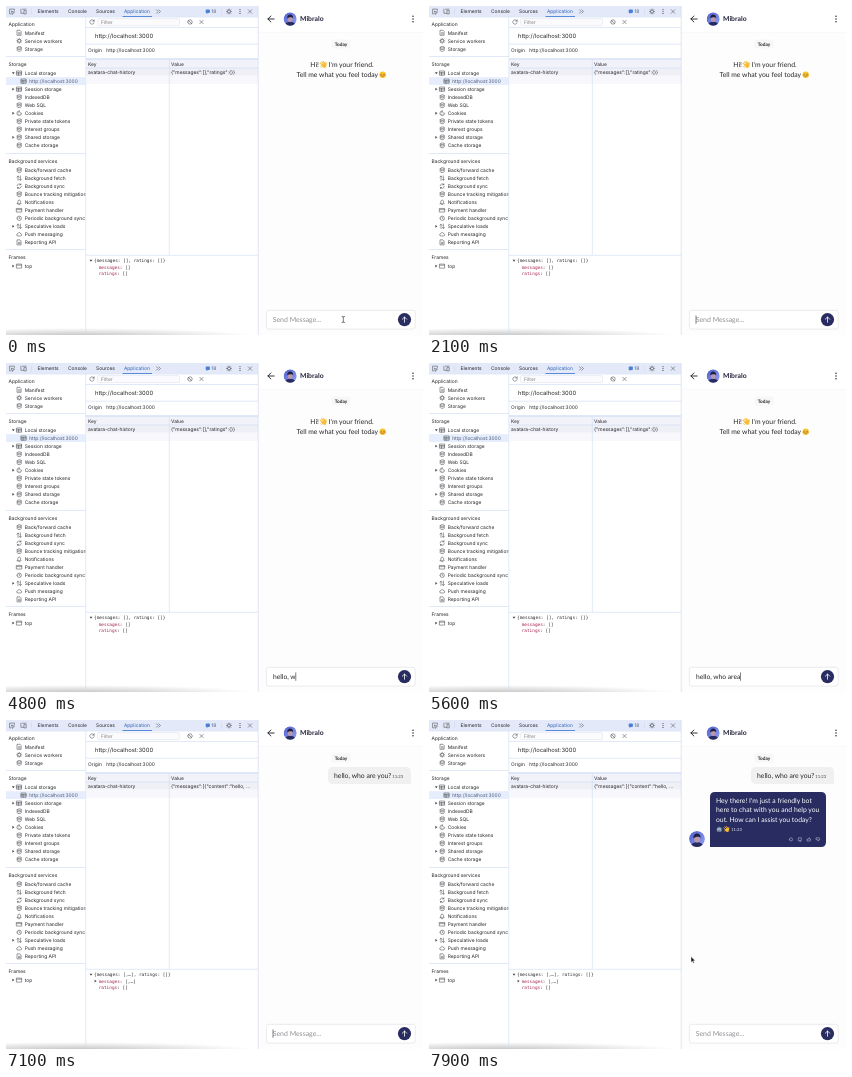
Animation of 417x329 px, one loop 8 s. Source, as an HTML page:

```html
<!DOCTYPE html>
<html lang="en">
<head>
<meta charset="utf-8">
<title>Chat history in local storage</title>
<style>
html, body { margin: 0; width: 100%; height: 100%; overflow: hidden; background: #fff; }
svg { display: block; width: 100vw; height: 100vh; }
text { white-space: pre; text-rendering: geometricPrecision; fill: #25262a; }
.ui { font: 4.9px Inter, Roboto, sans-serif; }
.mono { font: 4.4px "DejaVu Sans Mono", monospace; }
.chat { font: 6.82px Lato, "Open Sans", sans-serif; }
.key { fill: #a3204f; }
.icon { fill: none; stroke: #55585f; stroke-width: .6; stroke-linejoin: round; stroke-linecap: round; }
.rule { stroke: #cddbf4; stroke-width: .6; }
</style>
</head>
<body>
<svg id="stage" viewBox="0 0 417 329" xmlns="http://www.w3.org/2000/svg">
  <defs>
    <linearGradient id="sky" x1="0" y1="0" x2="1" y2="1">
      <stop offset="0" stop-color="#4d5ed0"/><stop offset="1" stop-color="#97a4f0"/>
    </linearGradient>
    <radialGradient id="shade">
      <stop offset="0" stop-color="#777" stop-opacity=".45"/><stop offset="1" stop-color="#777" stop-opacity="0"/>
    </radialGradient>
    <clipPath id="disc"><circle r="8"/></clipPath>
    <clipPath id="side"><rect width="79.5" height="329"/></clipPath>
    <g id="face" clip-path="url(#disc)">
      <circle r="8" fill="url(#sky)"/>
      <path d="M-6.5 9C-6 4-3 3.2 0 3.2S6 4 6.5 9z" fill="#272b5f"/>
      <ellipse cy="-.4" rx="3" ry="4" fill="#b798ac"/>
      <path d="M-3.5-.6C-4.6-7 4.6-7 3.5-.6 2.8-3-1.6-2.4-3.5-.6z" fill="#1f2044"/>
    </g>
    <g id="wave" fill="#f7bd35">
      <path d="M-3.2-1.4L-.8 1M-1.8-2.8L.7-.2M0-3.1L1.9-.8M2.7-1.9L2.5 .8" stroke="#f7bd35" stroke-width="1.15" stroke-linecap="round"/>
      <path d="M-1.4 0L1.8-1.5 2.9 .6Q3.2 3.2 1 3.3 -.4 3.3-2.4 1z"/>
      <path d="M-3.1 1.5Q-2.8 3-1.4 3.2" fill="none" stroke="#d79c2c" stroke-width=".4"/>
    </g>
    <g id="smile">
      <circle r="3.2" fill="#f9c62f"/>
      <g fill="none" stroke="#744b18" stroke-width=".55" stroke-linecap="round">
        <path d="M-2-.5Q-1.4-1.4-.7-.5M.7-.5Q1.4-1.4 2-.5M-1.6 1Q0 2.5 1.6 1"/>
      </g>
      <circle cx="-2.2" cy=".6" r=".7" fill="#f28b55"/><circle cx="2.2" cy=".6" r=".7" fill="#f28b55"/>
    </g>
    <g id="robot">
      <rect x="-2.5" y="-2" width="5" height="4.7" rx="1" fill="#a9bdc9"/>
      <path d="M0-2V-3.3M-3 0V1.4M3 0V1.4" stroke="#e36b5b" stroke-width=".7"/>
      <circle cx="-1.1" cy="-.3" r=".7" fill="#3da2b9"/><circle cx="1.1" cy="-.3" r=".7" fill="#3da2b9"/>
      <path d="M-1.3 1.6H1.3" stroke="#48515c" stroke-width=".7"/>
    </g>
  </defs>
  <g id="tools"></g>
  <g id="chat"></g>
</svg>
<script>
const NS = "http://www.w3.org/2000/svg";
const tools = document.getElementById("tools");
const chat = document.getElementById("chat");

function add(parent, tag, attrs = {}, content) {
  const node = document.createElementNS(NS, tag);
  for (const k in attrs) node.setAttribute(k, attrs[k]);
  if (content !== undefined) node.textContent = content;
  parent.append(node);
  return node;
}
const box = (p, x, y, width, height, fill, more) => add(p, "rect", { x, y, width, height, fill, ...more });
const group = (p, x = 0, y = 0) => add(p, "g", { transform: `translate(${x} ${y})` });
const label = (p, x, y, s, cls = "ui", style = "") => add(p, "text", { x, y, class: cls, style }, s);
const rule = (x1, y1, x2, y2) => add(tools, "line", { x1, y1, x2, y2, class: "rule" });
const icon = (p, x, y, d, style = "") => add(p, "path", { d, class: "icon", transform: `translate(${x} ${y})`, style });
const use = (p, id, x, y, scale = 1) =>
  add(p, "use", { href: "#" + id, transform: `translate(${x} ${y}) scale(${scale})` });
const show = (node, on) => node.setAttribute("visibility", on ? "visible" : "hidden");
const move = (node, x, y) => node.setAttribute("transform", `translate(${x} ${y})`);

const ICONS = {
  doc: "M-1.8-2.5H.8L1.9-1.4V2.5H-1.8zM-.8 0H.9M-.8 1.2H.9",
  gear: "M-1.6 0A1.6 1.6 0 1 0 1.6 0A1.6 1.6 0 1 0-1.6 0M0-2.5V-1.7M0 1.7V2.5M-2.5 0H-1.7M1.7 0H2.5M-1.8-1.8L-1.2-1.2M1.8 1.8L1.2 1.2M-1.8 1.8L-1.2 1.2M1.8-1.8L1.2-1.2",
  db: "M-2-1.6C-2-2.7 2-2.7 2-1.6S-2-.5-2-1.6V1.6C-2 2.7 2 2.7 2 1.6V-1.6M-2 0C-2 1.1 2 1.1 2 0",
  table: "M-2.4-2.1H2.4V2.1H-2.4zM-2.4-.7H2.4M-2.4 .7H2.4M-.7-.7V2.1",
  cookie: "M0-2.3A2.3 2.3 0 1 0 2.3 0Q1 .2 .9-.9-.1-.9 0-2.3M-.9-.4V-.3M-.3 1.1V1.2",
  updown: "M-1.2 2.2V-2.1M-2.3-1L-1.2-2.1-.1-1M1.2-2.2V2.1M.1 1L1.2 2.1 2.3 1",
  sync: "M-2.1-.4A2.1 2.1 0 0 1 1.7-1.3V-2.4M1.7-1.3H.5M2.1 .4A2.1 2.1 0 0 1-1.7 1.3V2.4M-1.7 1.3H-.5",
  bell: "M-2 1.5H2L1.4 .7V-.6Q1.3-2 0-2.2-1.3-2-1.4-.6V.7zM-.5 2.4H.5",
  card: "M-2.5-1.8H2.5V1.8H-2.5zM-2.5-.6H2.5",
  clock: "M-2.2 0A2.2 2.2 0 1 0 2.2 0A2.2 2.2 0 1 0-2.2 0M0-1.2V0L1 .7",
  cloud: "M-1.5 1.6Q-2.7 1.5-2.6 .4-2.4-.6-1.5-.6-1-1.9 .1-1.8 1.4-1.7 1.5-.5 2.7-.4 2.6 .7 2.4 1.6 1.6 1.6z",
  frame: "M-2.4-2H2.4V2H-2.4zM-2.4-.9H2.4"
};

// Title, y of title, then "name|icon|arrow" items
const SECTIONS = [
  ["Application", 17.7, ["Manifest|doc", "Service workers|gear", "Storage|db"]],
  ["Storage", 58, ["Local storage|table|open", "http://localhost:3000|table|child", "Session storage|table|shut",
    "IndexedDB|db", "Web SQL|db", "Cookies|cookie|shut", "Private state tokens|db", "Interest groups|db",
    "Shared storage|db|shut", "Cache storage|db"]],
  ["Background services", 155, ["Back/forward cache|db", "Background fetch|updown", "Background sync|sync",
    "Bounce tracking mitigations|db", "Notifications|bell", "Payment handler|card", "Periodic background sync|clock",
    "Speculative loads|updown|shut", "Push messaging|cloud", "Reporting API|doc"]],
  ["Frames", 251, ["top|frame|shut"]]
];
const SHUT = "M-.9-1.4L1.1 0-.9 1.4z", OPEN = "M-1.4-.9L0 1.1 1.4-.9z";
const arrow = (p, x, y, d) => add(p, "path", { d, fill: "#444", transform: `translate(${x} ${y})` });

function buildSidebar() {
  const g = add(tools, "g", { "clip-path": "url(#side)" });
  box(g, 0, 71.2, 80, 7.8, "#e6edfc");
  for (const [title, top, items] of SECTIONS) {
    if (top > 20) rule(0, top - 7.5, 79.5, top - 7.5);
    label(g, 2.6, top + 1.8, title);
    items.forEach((item, i) => {
      const [name, kind, state] = item.split("|");
      const y = top + 9.1 + i * 8.03, child = state === "child", inset = child ? 4.5 : 0;
      icon(g, 13.2 + inset, y, ICONS[kind]);
      label(g, 18.7 + inset, y + 1.8, name, "ui", child ? "fill:#4b5878" : "");
      if (state && !child) arrow(g, 7.3, y, state === "open" ? OPEN : SHUT);
    });
  }
}

function buildTools() {
  box(tools, 0, 0, 252, 329, "#fff");
  add(tools, "ellipse", { cx: 70, cy: 330, rx: 180, ry: 8, fill: "url(#shade)" });
  buildSidebar();
  box(tools, 0, 0, 252, 10.8, "#e3e9f8");
  rule(0, 11, 252, 11);
  icon(tools, 6, 5.5, "M2.4-1V-2.4H-2.4V2.4H-1M-.3-.3L2.6 .7 1.3 1.3 .7 2.6z");
  icon(tools, 17.5, 5.5, "M-1-2.3H2.6M-2.6-2.3V1.8H0M.8-.9H2.7V2.4H.8z");
  rule(25.5, 2.5, 25.5, 8.5);
  [["Elements", 31.5], ["Console", 62], ["Sources", 90]].forEach(([s, x]) => label(tools, x, 7.2, s));
  label(tools, 118, 7.2, "Application", "ui", "fill:#2f62b8");
  box(tools, 116.5, 10.1, 29.5, .9, "#4a7fd6");
  icon(tools, 152.5, 5.5, "M-2-1.7L-.3 0-2 1.7M.3-1.7L2 0 .3 1.7");
  box(tools, 199.7, 3.6, 4.2, 3.4, "#4a80d8", { rx: .8 });
  add(tools, "path", { d: "M200.7 6.8V8.1L202.3 6.8z", fill: "#4a80d8" });
  label(tools, 205.3, 7.2, "18", "ui", "fill:#4d5f88");
  rule(215.5, 2.5, 215.5, 8.5);
  icon(tools, 223, 5.5, ICONS.gear);
  [3.6, 5.5, 7.4].forEach(cy => add(tools, "circle", { cx: 234, cy, r: .55, fill: "#474747" }));
  icon(tools, 244, 5.5, "M-1.8-1.8L1.8 1.8M1.8-1.8L-1.8 1.8");
  rule(79.8, 11, 79.8, 329);

  icon(tools, 86, 16, "M2-1A2.2 2.2 0 1 0 2.1 .8M2.2-2.2V-.8H.8");
  box(tools, 91.5, 12.6, 82, 7, "#fbfbfe", { rx: 1, stroke: "#d9deea", "stroke-width": .5 });
  label(tools, 95, 17.9, "Filter", "ui", "fill:#808080");
  icon(tools, 184, 16, "M-2.2 0A2.2 2.2 0 1 0 2.2 0A2.2 2.2 0 1 0-2.2 0M-1.5-1.5L1.5 1.5");
  icon(tools, 195.5, 16, "M-1.7-1.7L1.7 1.7M1.7-1.7L-1.7 1.7");
  rule(80, 21.5, 252, 21.5);
  label(tools, 89, 32.2, "http://localhost:3000", "ui", "font-size:5.85px");
  rule(80, 38.2, 252, 38.2);
  label(tools, 82, 46, "Origin");
  label(tools, 100.3, 46, "http://localhost:3000");
  rule(80, 52.5, 252, 52.5);

  box(tools, 80, 53.5, 172, 8.5, "#f2f2fa");
  box(tools, 80, 62, 172, 7.8, "#efeff6");
  box(tools, 80, 69.8, 172, 8, "#f7f7fc");
  rule(80, 53.5, 252, 53.5);
  rule(80, 62, 252, 62);
  rule(163.3, 53.5, 163.3, 249);
  label(tools, 82, 59.7, "Key");
  label(tools, 165, 59.7, "Value");
  label(tools, 82, 67.8, "avatara-chat-history");
  rule(80, 249.3, 252, 249.3);
  arrow(tools, 85, 254.7, OPEN);
}

function preview(parent, y, key, value) {
  const t = label(parent, 92.7, y, "", "mono");
  add(t, "tspan", { class: "key" }, key);
  add(t, "tspan", {}, ": " + value);
}

// One version of the stored data: empty or filled
function storage(list, cell) {
  const g = group(tools);
  label(g, 165, 67.8, cell);
  label(g, 88, 256.2, `{messages: ${list}, ratings: []}`, "mono");
  preview(g, 262.7, "messages", list);
  preview(g, 269, "ratings", "[]");
  return g;
}

function buildHeader() {
  box(chat, 252, 0, 165, 329, "#fdfdfd");
  box(chat, 252, 0, 165, 26, "#fff");
  add(chat, "line", { x1: 252, y1: 26.3, x2: 417, y2: 26.3, stroke: "#f5f5f7", "stroke-width": .6 });
  add(chat, "line", { x1: 252.2, y1: 0, x2: 252.2, y2: 329, stroke: "#d5dbe8", "stroke-width": .7 });
  icon(chat, 264.9, 13, "M3.2 0H-3M0-3L-3 0 0 3", "stroke:#1c1c28;stroke-width:.9");
  use(chat, "face", 284.2, 13, .83);
  label(chat, 294, 15.4, "Mibralo", "chat", "font-weight:700;fill:#23233a");
  [10.2, 13, 15.8].forEach(cy => add(chat, "circle", { cx: 407, cy, r: .75, fill: "#222" }));
  box(chat, 325.5, 33.5, 19, 9, "#f7f7f8", { rx: 2 });
  label(chat, 335, 39.6, "Today", "chat", "text-anchor:middle;font-size:4.7px;font-weight:700");
}

buildTools();
const stored = [
  storage("[]", '{"messages":[],"ratings":{}}'),
  storage("[,…]", '{"messages":[{"content":"hello, …')
];
const openRow = arrow(tools, 89.5, 261.1, SHUT);
buildHeader();

const greeting = group(chat);
label(greeting, 304.3, 61.1, "Hi!", "chat");
use(greeting, "wave", 317.4, 58.6);
label(greeting, 322.6, 61.1, "I'm your friend.", "chat");
label(greeting, 290.5, 71, "Tell me what you feel today", "chat");
use(greeting, "smile", 376.7, 68.8);

const TIME = "font-size:4.2px;fill:";
const asked = group(chat);
add(asked, "path", { d: "M327 47H400Q405 47 405 52V64H327Q322 64 322 59V52Q322 47 327 47z", fill: "#f0f0f1" });
label(asked, 328, 57.9, "hello, who are you?", "chat");
label(asked, 386.3, 57.9, "11:23", "chat", TIME + "#444");

const REPLY = ["Hey there! I'm just a friendly bot", "here to chat with you and help you", "out. How can I assist you today?"];
const STEP = 9.67;
const reply = group(chat);
const bubble = add(reply, "path", { fill: "#292c60" });
const lines = REPLY.map((s, i) => label(reply, 287, 82.6 + i * STEP, "", "chat", "fill:#fff"));
const emoji = group(reply);
use(emoji, "robot", 290.3, 109.2, .85);
use(emoji, "wave", 297.5, 109.2, .85);
const stamp = label(reply, 0, 0, "11:23", "chat", TIME + "#e4e5f2");
const actions = group(reply);
["M-1.6 0A1.6 1.6 0 1 0 1.6 0A1.6 1.6 0 1 0-1.6 0", "M-1.3-1.6H1.3V1.2H-1.3zM-.4 2H.6",
 "M-1.6-.2H-.6L.2-1.8 .7-.4H1.7L1.2 1.6H-1.6z", "M-1.6 .2H-.6L.2 1.8 .7 .4H1.7L1.2-1.6H-1.6z"
].forEach((d, i) => icon(actions, i * 9 - 27, 0, d, "stroke:#c9cbe2;stroke-width:.5"));
const replyFace = use(reply, "face", 268, 90);

box(chat, 260.4, 304.3, 148.8, 18.8, "#fff", { rx: 2.2, stroke: "#e3e3e7", "stroke-width": .7 });
const hint = label(chat, 266.7, 316, "Send Message...", "chat", "font-size:6.95px;fill:#909097");
const typed = label(chat, 267, 316, "", "chat", "font-size:6.7px");
const caret = box(chat, -.3, 309.4, .6, 8.4, "#333");
add(chat, "circle", { cx: 398.5, cy: 313.6, r: 6.6, fill: "#292c60" });
icon(chat, 398.5, 313.6, "M0 2.6V-2.5M-2.2-.4L0-2.6 2.2-.4", "stroke:#fff;stroke-width:.8");

const beam = icon(chat, 0, 0, "M-1.2-3Q0-3 0-2.3 0-3 1.2-3M0-2.3V2.3M-1.2 3Q0 3 0 2.3 0 3 1.2 3",
  "stroke:#222;stroke-width:.6");
const pointer = add(chat, "path", { d: "M0 0V5.9L1.4 4.7 2.3 6.7 3.3 6.2 2.4 4.3H4.2z", fill: "#111", stroke: "#fff", "stroke-width": .5 });

// Time, letters typed of the sentence, caret
const ASK = "hello, who are you?";
const TYPING = [
  [0, 0, 0], [400, 0, 1], [600, 1, 1], [1000, 1, 0], [1300, 1, 1], [1400, 0, 1], [1700, 0, 0], [2100, 0, 1],
  [2400, 0, 0], [2700, 0, 1], [2800, 1, 1], [3000, 2, 1], [3100, 3, 1], [3200, 4, 1], [3400, 5, 1], [3800, 5, 0],
  [4000, 6, 1], [4200, 7, 1], [4500, 7, 0], [4800, 8, 1], [5000, 9, 1], [5200, 10, 1], [5300, 11, 1], [5400, 13, 1],
  [5500, 14, 1], [5900, 14, 1], [6000, 15, 1], [6300, 16, 1], [6400, 17, 1], [6500, 18, 1], [6800, 19, 1],
  [7000, 0, 1], [7400, 0, 0], [7600, 0, 1], [7800, 0, 0]
];

function drawReply(t) {
  show(reply, t >= 7600);
  const rows = t < 7700 ? 1 : t < 7800 ? 2 : t < 7900 ? 3 : 4;
  let left = [3, 46, 84, 200][rows - 1];
  lines.forEach((line, i) => {
    line.textContent = REPLY[i].slice(0, Math.max(0, left));
    left -= REPLY[i].length;
  });
  const right = rows === 1 ? 325 : 397, bottom = 98 + (rows - 1) * STEP;
  bubble.setAttribute("d", `M286 72H${right - 5}q5 0 5 5V${bottom - 5}q0 5-5 5H281V77q0-5 5-5z`);
  emoji.setAttribute("visibility", rows === 4 ? "inherit" : "hidden");
  const end = rows === 4 ? 302.2 : 289 + lines[rows - 1].getComputedTextLength();
  stamp.setAttribute("x", end);
  stamp.setAttribute("y", 82.4 + (rows - 1) * STEP);
  move(actions, right - 8, bottom - 7.6);
  move(replyFace, 268, bottom - 8);
}

function draw(t) {
  const [, count, on] = TYPING.findLast(row => row[0] <= t);
  const sent = t >= 7000;
  const slip = t >= 5600 && t < 5900 ? "a" : "";
  typed.textContent = ASK.slice(0, count) + slip;
  show(hint, !count);
  show(caret, on);
  move(caret, 267 + (count ? typed.getComputedTextLength() + .3 : 0), 0);

  show(greeting, !sent);
  show(asked, sent);
  show(stored[0], !sent);
  show(stored[1], sent);
  show(openRow, sent);
  drawReply(t);

  show(beam, t < 600);
  const p = Math.min(1, t / 400);
  move(beam, 337.3 - 40 * p * p * (3 - 2 * p), 313.5);
  show(pointer, t >= 7800);
  const q = Math.min(1, Math.max(0, (t - 7800) / 100));
  move(pointer, 270 - 8 * q, 258 - 21.5 * q);
}

const start = performance.now();
function tick() {
  draw((performance.now() - start) % 8000);
  requestAnimationFrame(tick);
}
tick();
</script>
</body>
</html>
```
